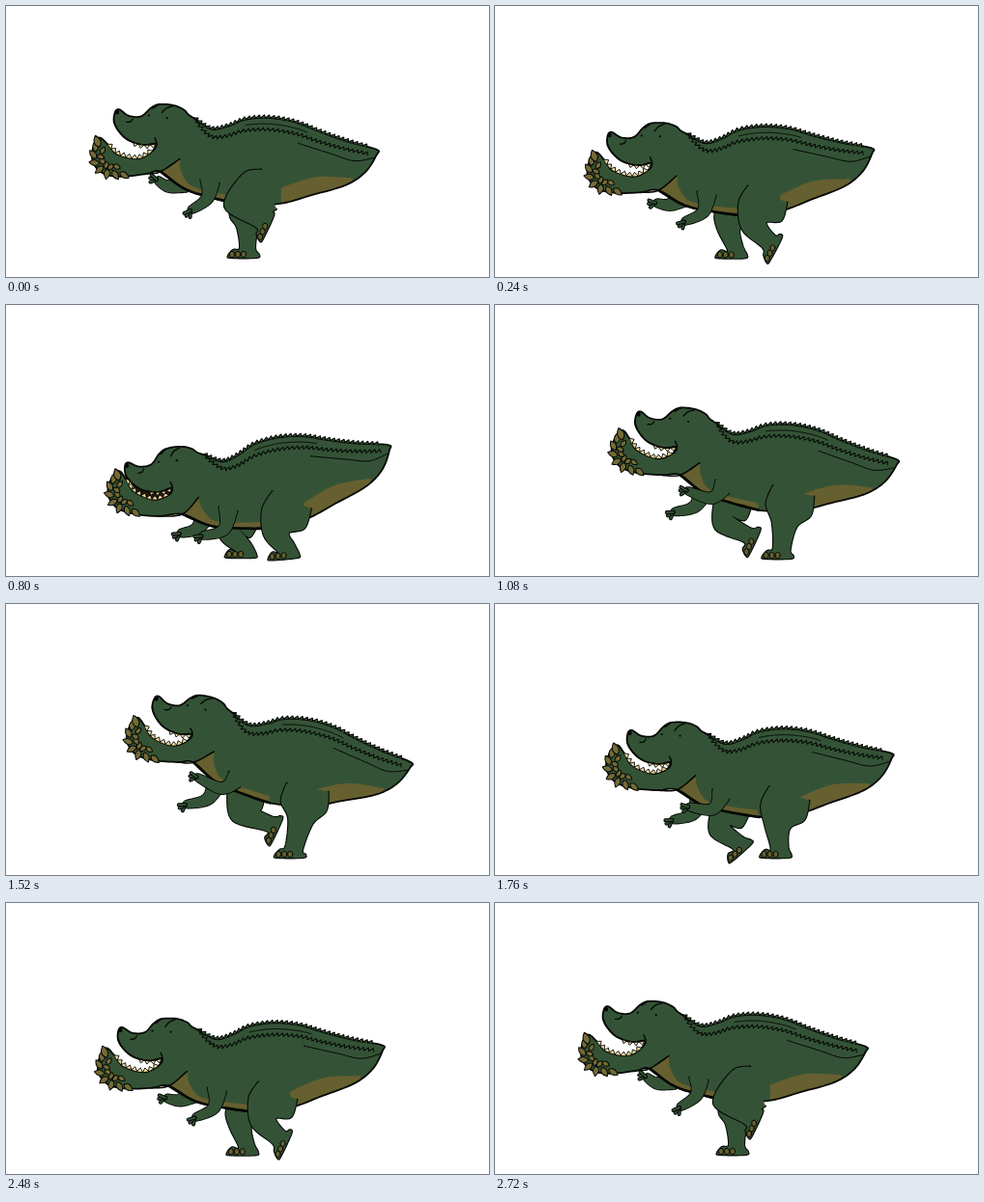
Animation of 500x281 px, one loop 2800 ms. Source, as an HTML page with a canvas:

```html
<!DOCTYPE html>
<html lang="en">
<head>
<meta charset="utf-8">
<title>Dancing dinosaur</title>
<style>
html, body { margin: 0; width: 100%; height: 100%; overflow: hidden; background: #fff; }
canvas { display: block; width: 100vw; height: 100vh; }
</style>
</head>
<body>
<canvas id="stage" width="500" height="281"></canvas>
<script>
const ctx = document.getElementById("stage").getContext("2d");
const GREEN = "#345336", BROWN = "#665f2f", LEAF = "#756a35", TOOTH = "#f0d79b", INK = "#050805";
const LOOP = 2800, STEP = 120;
const RAD = Math.PI / 180;

// The upper body is one rigid shape that turns about the nape; the jaw turns about its hinge.
const NAPE = [194, 131], HINGE = [158, 167];
const shape = {
  head: [[159, 163], [146, 166], [130, 163], [119, 155], [113, 146], [113, 136], [117, 133], [127, 138],
    [140, 137], [149, 127], [157, 122], [172, 121], [183, 124], [188, 128]],
  back: [NAPE, [214, 140], [232, 134], [248, 125], [273, 120], [300, 121], [325, 127], [355, 133], [386, 137]],
  under: [[387, 143], [378, 162], [360, 178], [327, 193], [294, 207]],
  belly: [[255, 213], [222, 210], [195, 205], [168, 191]],
  jaw: [[150, 194], [125, 196], [106, 193], [95, 182], [94, 168], [101, 155], [110, 162], [120, 173], [142, 178], [157, 170]],
  chest: [[186, 175], [190, 189], [205, 202], [252, 206]],
  rump: [[294, 190], [328, 174], [366, 170]],
  tail: [[305, 142], [340, 148], [365, 152], [385, 146]],
  eyes: [[148, 135], [167, 135]]
};

// Joints from the body outwards, when crouching and at the top of each sway.
const limbs = {
  nearLeg: {
    crouch: [[297, 203], [280, 238], [291, 253]],
    left: [[272, 190], [238, 203], [264, 222]],
    right: [[316, 187], [311, 222], [300, 253]]
  },
  farLeg: {
    crouch: [[244, 222], [231, 238], [247, 252]],
    left: [[250, 205], [250, 230], [250, 251]],
    right: [[252, 190], [250, 200], [292, 210]]
  },
  nearArm: {
    crouch: [[231, 213], [226, 235], [203, 241]],
    left: [[211, 182], [208, 200], [191, 212]],
    right: [[238, 174], [222, 180], [196, 164]]
  },
  farArm: {
    crouch: [[205, 223], [198, 235], [181, 240]],
    left: [[185, 183], [168, 187], [156, 180]],
    right: [[220, 178], [210, 195], [187, 200]]
  }
};

const sways = {
  left: { shift: [-10, -41], turn: 13.4, lifted: "nearLeg" },
  right: { shift: [37, -56], turn: 24, lifted: "farLeg" }
};

const mix = (a, b, t) => [a[0] + (b[0] - a[0]) * t, a[1] + (b[1] - a[1]) * t];

function rotate([x, y], [cx, cy], angle) {
  const c = Math.cos(angle), s = Math.sin(angle);
  return [cx + (x - cx) * c - (y - cy) * s, cy + (x - cx) * s + (y - cy) * c];
}

// Each half loop falls in five steps, rests, then rises in four.
function riseAt(time) {
  const half = time % (LOOP / 2);
  const fall = 1 - Math.min(5, Math.floor(half / STEP)) / 5;
  const climb = Math.max(0, Math.floor(half / STEP) - 7) / 4;
  const rest = time >= 600 && time < 800 ? 0 : .05;
  return Math.max(fall, Math.sin(Math.PI / 2 * climb ** 1.2), rest);
}

function makePose(time) {
  const rise = riseAt(time);
  const side = time >= 960 && time < 2000 ? "right" : "left";
  const { shift, turn, lifted } = sways[side];
  const dx = 10 + shift[0] * rise, dy = 26 + shift[1] * rise;
  const tilt = (turn * rise - 5.4) * RAD, bite = (16 - 26 * rise) * RAD;
  const place = point => {
    const [x, y] = rotate(point, NAPE, tilt);
    return [x + dx, y + dy];
  };
  const pose = { rise, lifted, place };
  for (const part in shape) {
    pose[part] = shape[part].map(p => place(part === "jaw" ? rotate(p, HINGE, bite) : p));
  }
  for (const name in limbs) {
    const limb = limbs[name];
    pose[name] = limb.crouch.map((p, i) =>
      mix(p, limb[side][i], name === lifted && i ? rise ** 2.5 : rise));
  }
  return pose;
}

// Dense Catmull-Rom curve through the points.
function curve(points, closed = false) {
  const n = points.length, out = [];
  const at = i => closed ? points[(i + n) % n] : points[Math.max(0, Math.min(n - 1, i))];
  for (let i = 0; i < (closed ? n : n - 1); i++) {
    const [a, b, c, d] = [at(i - 1), at(i), at(i + 1), at(i + 2)];
    for (let t = 0; t < 1; t += .125) {
      out.push([0, 1].map(k => b[k] + .5 * t * (c[k] - a[k] +
        t * (2 * a[k] - 5 * b[k] + 4 * c[k] - d[k] + t * (3 * (b[k] - c[k]) + d[k] - a[k])))));
    }
  }
  if (!closed) out.push(points[n - 1]);
  return out;
}

// Points at equal distances along a curve.
function spaced(points, gap) {
  const line = curve(points), out = [line[0]];
  let left = gap;
  for (let i = 1; i < line.length; i++) {
    const length = Math.hypot(line[i][0] - line[i - 1][0], line[i][1] - line[i - 1][1]);
    let along = left;
    for (; along <= length; along += gap) out.push(mix(line[i - 1], line[i], along / length));
    left = along - length;
  }
  return out;
}

function trace(line) {
  ctx.beginPath();
  line.forEach(p => ctx.lineTo(...p));
}

function paint(fill, width = 0) {
  if (fill) { ctx.fillStyle = fill; ctx.fill(); }
  if (width) { ctx.strokeStyle = INK; ctx.lineWidth = width; ctx.stroke(); }
}

function stroke(points, width) {
  trace(curve(points));
  paint(null, width);
}

function ellipse([x, y], rx, ry, fill, width) {
  ctx.beginPath();
  ctx.ellipse(x, y, rx, ry, 0, 0, 2 * Math.PI);
  paint(fill, width);
}

function spikes(points, gap, height, lean, fill, width) {
  const base = spaced(points, gap);
  ctx.beginPath();
  for (let i = 1; i < base.length; i++) {
    const [x, y] = base[i - 1], [u, v] = base[i];
    const tx = (u - x) / gap, ty = (v - y) / gap;
    ctx.moveTo(x, y);
    ctx.lineTo((x + u) / 2 + ty * height + tx * lean, (y + v) / 2 - tx * height + ty * lean);
    ctx.lineTo(u, v);
  }
  paint(fill, width);
}

// Outline along the joints, with the end points placed between both sides.
function drawLimb(joints, widths, end, line) {
  const edge = sign => joints.map(([x, y], i) => {
    const [a, b] = joints[Math.max(0, i - 1)], [c, d] = joints[Math.min(joints.length - 1, i + 1)];
    const scale = sign * widths[i] / Math.hypot(c - a, d - b);
    return [x - (d - b) * scale, y + (c - a) * scale];
  });
  trace(curve([...edge(1), ...end, ...edge(-1).reverse()]));
  paint(null, line * 2);
  paint(GREEN);
}

function drawLeg(pose, name, widths) {
  const [hip, knee, ankle] = pose[name];
  const angle = name === pose.lifted ? Math.min(1, pose.rise * 1.6) * 65 * RAD : 0;
  const c = Math.cos(angle), s = Math.sin(angle);
  const foot = (ahead, down) => [ankle[0] - c * ahead + s * down, ankle[1] + s * ahead + c * down];
  drawLimb([hip, mix(hip, knee, .55), knee, ankle], widths,
    [foot(15, 2), foot(20, 8), foot(17, 10), foot(-9, 10), foot(-12, 7)], 1.1);
  for (const ahead of [16, 10, 4]) ellipse(foot(ahead, 6.5), 2.6, 3.2, BROWN, 1);
}

function drawArm(joints) {
  const [, elbow, hand] = joints;
  drawLimb(joints, [10, 6, 3.5], [], .9);
  const angle = Math.atan2(hand[1] - elbow[1], hand[0] - elbow[0]);
  for (const spread of [-.9, -.3, .2]) {
    trace([hand, [hand[0] + 7 * Math.cos(angle + spread), hand[1] + 7 * Math.sin(angle + spread)]]);
    paint(null, 4);
    ctx.strokeStyle = GREEN;
    ctx.lineWidth = 2;
    ctx.stroke();
  }
}

function drawBody(p) {
  const outline = curve([...p.head, ...p.back, ...p.under, ...p.belly, ...p.jaw], true);
  trace(outline);
  paint(GREEN);
  ctx.save();
  ctx.clip();
  trace([...curve(p.chest), ...curve(p.belly)]);
  paint(BROWN);
  const rump = curve(p.rump);
  trace([...rump, ...rump.slice().reverse().map(([x, y]) => [x, y + 45])]);
  paint(BROWN);
  ctx.restore();
  trace(outline);
  ctx.closePath();
  paint(null, 1.8);
  stroke(p.belly, 2.6);
  stroke([p.jaw[0], p.belly[3], p.chest[0]], 1.6);
}

function drawBack({ place }) {
  const line = spaced(shape.back, 5);
  const depth = share => 11 * Math.sin(Math.PI * share ** .6) + 8 * share;
  const below = amount => line.map(([x, y], i) => place([x, y + amount * depth(i / (line.length - 1))]));
  spikes(below(0), 5, 3, 1.5, GREEN, 1.1);
  spikes(below(1), 5, 3.4, 1.5, null, 1.1);
  stroke(below(.45).slice(line.length * .3, line.length * .65), 1);
}

function drawFace(p) {
  const lip = p.head.slice(0, 5), gum = p.jaw.slice(5);
  if (p.rise < .2) {
    trace([...curve(lip.slice(0, 4)), ...curve(gum.slice(2))]);
    paint("#20190c");
  }
  spikes(gum.slice(1), 6, 4, 0, TOOTH, .9);
  spikes(lip.slice(0, 3), 6, 4, 0, TOOTH, .9);
  stroke(lip, 1.5);
  const [x, y] = lip[0];
  stroke([[x - 1, y - 6], [x + 1, y], p.jaw[9]], 1.5);

  p.eyes.forEach(eye => ellipse(eye, 1.1, 1.1, INK));
  const mark = (...points) => stroke(points.map(p.place), 1.4);
  mark([157, 122], [151, 127]);
  mark([171, 122], [165, 125], [161, 130]);
  mark([126, 145], [130, 144], [132, 141]);
  ellipse(p.place([115, 136]), 2, 2.5, INK);
}

function leaf(x, y, angle, length, width) {
  ctx.save();
  ctx.translate(x, y);
  ctx.rotate(angle);
  ctx.beginPath();
  ctx.moveTo(-length * .4, 0);
  ctx.quadraticCurveTo(0, -width, length * .6, 0);
  ctx.quadraticCurveTo(0, width, -length * .4, 0);
  paint(LEAF, 1);
  ctx.restore();
}

// Leaf-like scales along the rim of the chin and, smaller, inside it.
function drawChin(jaw) {
  const gap = 9, rim = spaced(jaw.slice(1, 6), gap), last = rim.length - 1;
  for (let i = 0; i < last; i++) {
    const [x, y] = rim[i], [u, v] = rim[i + 1];
    const nx = (v - y) / gap, ny = (x - u) / gap;
    const sweep = (i / last - .45) * 2.4;
    const angle = Math.atan2(ny, nx) + sweep;
    leaf(x - nx * 2, y - ny * 2, angle, 11, 6);
    if (i > 0) leaf(x - nx * 10, y - ny * 10, angle + .6 * (-1) ** i, 8, 5);
  }
  leaf(jaw[5][0] - 1, jaw[5][1] + 5, -1.9, 13, 7);
}

function drawDinosaur(p) {
  ctx.clearRect(0, 0, 500, 281);
  ctx.lineJoin = ctx.lineCap = "round";
  drawArm(p.farArm);
  drawLeg(p, "farLeg", [18, 18, 11, 8]);
  drawBody(p);
  drawBack(p);
  stroke(p.tail, 1);
  drawFace(p);
  drawChin(p.jaw);
  drawLeg(p, "nearLeg", [22, 24, 13, 9]);
  drawArm(p.nearArm);
}

function frame() {
  drawDinosaur(makePose(performance.now() % LOOP));
  requestAnimationFrame(frame);
}
frame();
</script>
</body>
</html>
```
